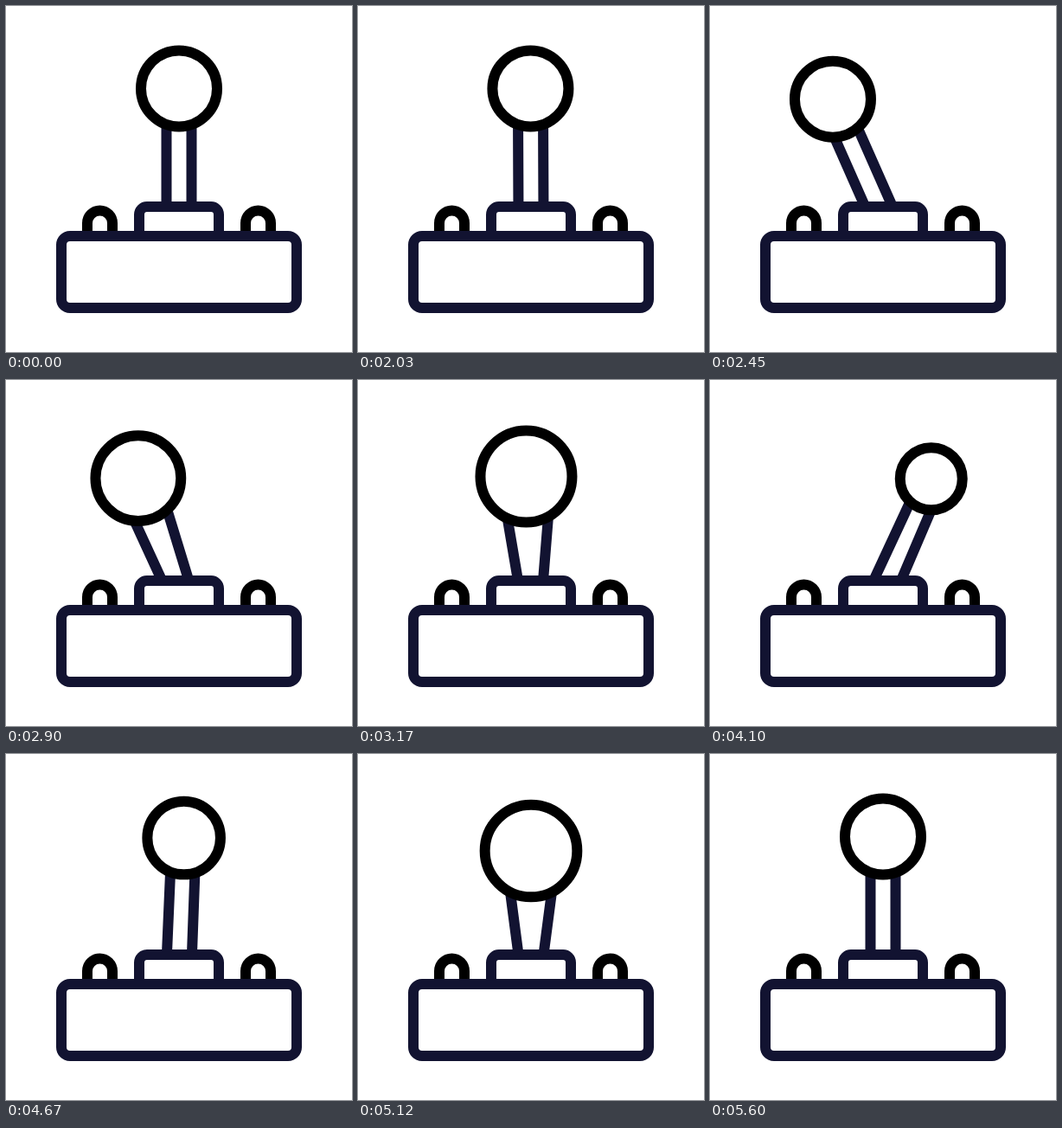
Animation, 400 px wide and 400 px high, one loop 5.63 s. Source, as an HTML page:

```html
<!DOCTYPE html>
<html lang="en">
<head>
<meta charset="utf-8">
<title>Joystick</title>
<style>
  html, body { margin: 0; width: 100%; height: 100%; overflow: hidden; background: #fff; }
  svg { display: block; width: 100%; height: 100%; }
  .navy { stroke: #121331; }
  .black { stroke: #000; }
</style>
</head>
<body>
<svg viewBox="0 0 400 400" fill="#fff" stroke-width="12">
  <path id="rods" class="navy"/>
  <circle id="knob" class="black"/>
  <path class="navy" d="M154 266V241a9 9 0 0 1 9-9H237a9 9 0 0 1 9 9V266"/>
  <path class="black" d="M94 264V251a14.5 14.5 0 0 1 29 0V264M277 264V251a14.5 14.5 0 0 1 29 0V264"/>
  <rect class="navy" x="64" y="266" width="272" height="83" rx="10"/>
</svg>
<script>
  const LOOP = 5630, STEP = 30, START = 2030;
  const CENTER = 200, PIVOT = 239, ROOT = 243, REACH = 143.6, RADIUS = 50, GAP = 14.5;

  // Ease like cubic-bezier(a, 0, b, 1)
  function ease(p, a = 1 / 3, b = 1 - a) {
    let lo = 0, hi = 1;
    for (let i = 0; i < 20; i++) {
      const u = (lo + hi) / 2, w = 1 - u;
      if (3 * w * w * u * a + 3 * w * u * u * b + u * u * u < p) lo = u;
      else hi = u;
    }
    return lo * lo * (3 - 2 * lo);
  }

  // Share of a move done at time t
  const move = (t, from, to, a, b) =>
    ease(Math.min(1, Math.max(0, (t - from) / (to - from))), a, b);

  // Degrees: left, sweep to the right, back upright
  const tiltAt = t =>
    -25.5 * move(t, 2000, 2533) + 52.1 * move(t, 2560, 3840, 0.6) - 26.6 * move(t, 3928, 4833);

  // Knob radius: near, far, near again, rest
  const radiusAt = t =>
    RADIUS + 9 * move(t, 2533, 3180) - 17 * move(t, 3180, 4090)
    + 18 * move(t, 4090, 5020, 0.8, 0.75) - 10 * move(t, 5030, 5600);

  const knob = document.getElementById('knob');
  const rods = document.getElementById('rods');

  function draw(t) {
    const a = tiltAt(t) * Math.PI / 180, r = radiusAt(t);
    const sin = Math.sin(a), cos = Math.cos(a);
    const depth = r - RADIUS; // positive leans towards the viewer
    const reach = REACH - depth * (depth > 0 ? 1.78 : -0.87);
    const spread = GAP + depth * (depth > 0 ? 1.05 : 0.2);

    knob.setAttribute('cx', CENTER + reach * sin);
    knob.setAttribute('cy', PIVOT - reach * cos);
    knob.setAttribute('r', r - 6);

    const end = reach - r + 18; // hidden behind the knob
    const rod = side => {
      const foot = CENTER + (ROOT - 232) * sin / cos + side * GAP / cos;
      const x = CENTER + end * sin + side * spread * cos;
      const y = ROOT - end * cos + side * spread * sin;
      return `M${foot} 232L${x} ${y}`;
    };
    rods.setAttribute('d', rod(-1) + rod(1));
  }

  function tick() {
    const t = performance.now() % LOOP;
    draw(START + STEP * Math.floor((t - START) / STEP));
    requestAnimationFrame(tick);
  }
  tick();
</script>
</body>
</html>
```
